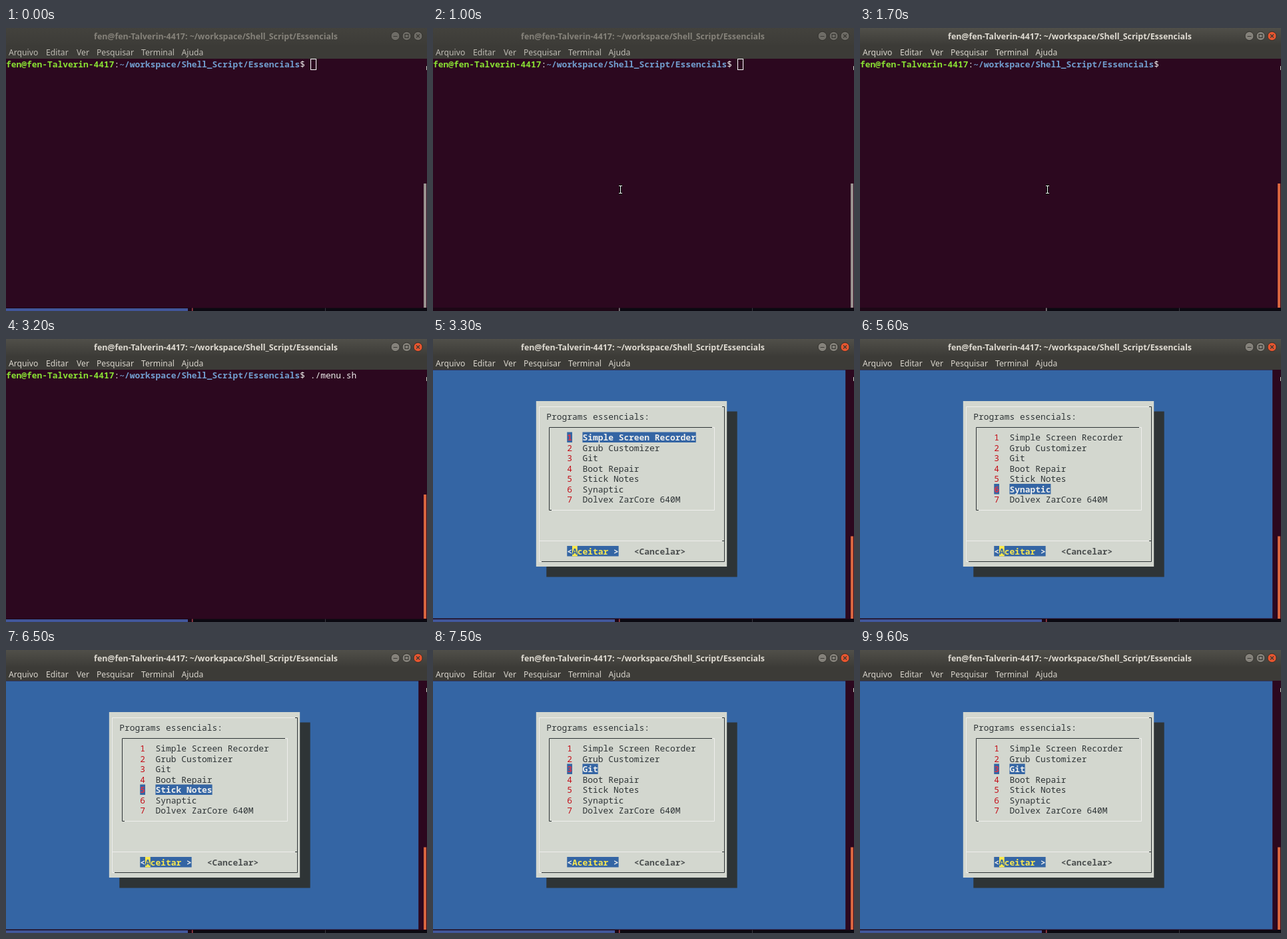
Recreate the animation shown at these times as an HTML page with a canvas. Size 632x424 px, loop 9800 ms.

```html
<!DOCTYPE html>
<html lang="pt">
<head>
<meta charset="utf-8">
<title>Terminal menu</title>
<style>
  html, body { margin: 0; width: 100%; height: 100%; overflow: hidden; background: #2c081f; }
  canvas { display: block; }
</style>
</head>
<body>
<canvas id="stage" width="632" height="424"></canvas>
<script>
const ctx = document.getElementById('stage').getContext('2d');
const LOOP = 9800, STEP = 100;
const CW = 7.74, RH = 15.5, TOP = 46.5;
const MONO = '12.9px "Noto Sans Mono", "DejaVu Sans Mono", monospace';
const SANS = '"Noto Sans", "Open Sans", sans-serif';

const BG = '#2c081f', BLUE = '#3465a4', PANEL = '#d3d7cf', INK = '#2e3436';
const LIGHT = '#eeeeec', RED = '#c4101a', YELLOW = '#fce94f', ORANGE = '#d9653f';

const USER = 'fen@fen-Talverin-4417';
const PATH = '~/workspace/Shell_Script/Essencials';
const MENUS = [['Arquivo', 4], ['Editar', 60], ['Ver', 106], ['Pesquisar', 136], ['Terminal', 203], ['Ajuda', 263.5]];
const ITEMS = ['Simple Screen Recorder', 'Grub Customizer', 'Git', 'Boot Repair',
  'Stick Notes', 'Synaptic', 'Dolvex ZarCore 640M'];

// Times in ms
const FOCUS = 1100, TYPE = 2200, COMPLETE = 2300, ENTER = 3200, DIALOG = 3300;
// [time, selected item]
const KEYS = [[DIALOG, 0], [4500, 1], [5000, 2], [5200, 3], [5400, 4], [5600, 5],
  [5800, 6], [6100, 5], [6400, 4], [6600, 3], [6900, 2]];

const colX = c => c * CW;
const rowY = r => TOP + r * RH;
const blinkOn = (t, since) => Math.floor((t - since) / 600) % 2 === 0;

function rect(x, y, w, h, color) {
  ctx.fillStyle = color;
  ctx.fillRect(x, y, w, h);
}

function cells(col, row, cols, rows, color) {
  rect(colX(col), rowY(row), cols * CW, rows * RH, color);
}

// Monospaced text on the character grid
function put(text, col, row, color, bold) {
  ctx.font = (bold ? 'bold ' : '') + MONO;
  ctx.textAlign = 'left';
  ctx.fillStyle = color;
  [...text].forEach((ch, i) => ctx.fillText(ch, colX(col + i), rowY(row) + 12.8));
}

function path(points, color, width = 1) {
  ctx.strokeStyle = color;
  ctx.lineWidth = width;
  ctx.beginPath();
  points.forEach(([x, y]) => ctx.lineTo(x, y));
  ctx.stroke();
}

function windowButton(x, fill, kind) {
  ctx.fillStyle = fill;
  ctx.strokeStyle = '#2f2e2a';
  ctx.lineWidth = 1;
  ctx.beginPath();
  ctx.arc(x, 12, 6.6, 0, Math.PI * 2);
  ctx.fill();
  ctx.stroke();
  const ink = '#3a3935';
  if (kind === 'min') path([[x - 3, 12.5], [x + 3, 12.5]], ink);
  if (kind === 'max') ctx.strokeRect(x - 2.5, 9.5, 5, 5);
  if (kind === 'close') {
    path([[x - 2.5, 9.5], [x + 2.5, 14.5]], ink, 1.2);
    path([[x - 2.5, 14.5], [x + 2.5, 9.5]], ink, 1.2);
  }
}

function drawHeader(focused) {
  const shade = ctx.createLinearGradient(0, 0, 0, 25);
  shade.addColorStop(0, focused ? '#504f49' : '#43423d');
  shade.addColorStop(1, '#3d3c38');
  rect(0, 0, 632, 46, '#3c3b37');
  rect(0, 0, 632, 25, shade);

  ctx.font = `bold 12.4px ${SANS}`;
  ctx.textAlign = 'center';
  ctx.fillStyle = focused ? '#dfdbd2' : '#85827a';
  ctx.fillText(`${USER}: ${PATH}`, 315, 16.5);

  ctx.font = `12.2px ${SANS}`;
  ctx.textAlign = 'left';
  ctx.fillStyle = focused ? '#d9d5cc' : '#bfbcb4';
  MENUS.forEach(([label, x]) => ctx.fillText(label, x, 40.5));

  const grey = focused ? '#85827b' : '#6e6c66';
  windowButton(584.5, grey, 'min');
  windowButton(601.5, grey, 'max');
  windowButton(618.5, focused ? '#e8562f' : grey, 'close');
}

function drawEdges(t, focused) {
  const lit = t < 300 || t >= ENTER;
  rect(0, 419.5, 632, 4.5, '#0b0911');
  rect(0, 419.5, 280, 4.5, '#1d0716');
  if (lit) rect(0, 420, 273, 4, '#42569a');
  rect(279, 419.5, 1.5, 4.5, lit ? '#a8404a' : '#8d8589');
  rect(479, 419.5, 1, 4.5, '#3a3840');
  const y = t < DIALOG ? 233 : 295.5;
  rect(627, y, 4, 419 - y, focused ? ORANGE : '#99928f');
  rect(631, 57, 1, 6, '#c9ccc0');
}

function drawPrompt(t) {
  put(USER, 0, 0, '#8ae234', true);
  put(':', 21, 0, LIGHT);
  put(PATH, 22, 0, '#729fcf', true);
  put('$', 57, 0, LIGHT);
  const typed = t < TYPE ? '' : t < COMPLETE ? './m' : './menu.sh ';
  put(typed, 59, 0, LIGHT);

  const col = 59 + typed.length;
  if (t < FOCUS) {
    ctx.strokeStyle = '#ffffff';
    ctx.lineWidth = 1;
    ctx.strokeRect(457.5, 46.5, 8, 16);
  } else if (blinkOn(t, t < TYPE ? FOCUS : COMPLETE - (t < COMPLETE ? STEP : 0))) {
    cells(col, 0, 1, 1, '#ffffff');
  }
}

function drawPointer(t) {
  if (t < STEP || t >= TYPE) return;
  const p = Math.min(1, t / 1000), e = 1 - (1 - p) ** 2;
  const x = Math.round(400 - 119 * e) + 0.5, y = Math.round(420 - 178 * e);
  for (const [color, width] of [['#000000', 3], ['#ffffff', 1]]) {
    path([[x, y - 6], [x, y + 6]], color, width);
    path([[x - 2.5, y - 5.5], [x + 2.5, y - 5.5]], color, width);
    path([[x - 2.5, y + 5.5], [x + 2.5, y + 5.5]], color, width);
  }
}

function drawDialog(t) {
  cells(0, 0, 80, 24, BLUE);
  cells(22, 4, 37, 16, INK);
  cells(20, 3, 37, 16, PANEL);

  // Raised outer frame
  path([[434, 101.5], [159.5, 101.5], [159.5, 333.5], [163, 333.5]], LIGHT);
  path([[434, 101.5], [437.5, 101.5], [437.5, 333.5], [163, 333.5]], INK);
  path([[160, 302.5], [434, 302.5]], LIGHT);
  path([[434, 302.5], [437.5, 302.5]], INK);

  // Sunken list frame
  path([[419, 132.5], [174.5, 132.5], [174.5, 256.5], [178, 256.5]], INK);
  path([[419, 132.5], [422.5, 132.5], [422.5, 256.5], [178, 256.5]], LIGHT);

  put('Programs essencials:', 22, 4, INK);
  const [since, selected] = KEYS.findLast(k => t >= k[0]);
  ITEMS.forEach((label, i) => {
    const row = 6 + i, on = i === selected;
    if (on) {
      cells(26, row, 1, 1, BLUE);
      cells(29, row, label.length, 1, BLUE);
    }
    put(String(i + 1), 26, row, on ? '#d8344a' : RED, on);
    put(label, 29, row, on ? LIGHT : INK, on);
  });

  cells(26, 17, 10, 1, BLUE);
  put('<', 26, 17, LIGHT, true);
  put('Aceitar', 27, 17, YELLOW, true);
  put('>', 35, 17, LIGHT, true);
  put('<Cancelar>', 39, 17, '#4b4f4f', true);
  if (blinkOn(t, since)) {
    cells(27, 17, 1, 1, YELLOW);
    put('A', 27, 17, BLUE, true);
  }
}

function draw(t) {
  const focused = t >= FOCUS;
  rect(0, 0, 632, 424, BG);
  drawHeader(focused);
  if (t < DIALOG) drawPrompt(t);
  else drawDialog(t);
  drawEdges(t, focused);
  drawPointer(t);
}

const start = performance.now();
function tick() {
  const t = (performance.now() - start) % LOOP;
  draw(Math.floor(t / STEP) * STEP);
  requestAnimationFrame(tick);
}
tick();
</script>
</body>
</html>
```
